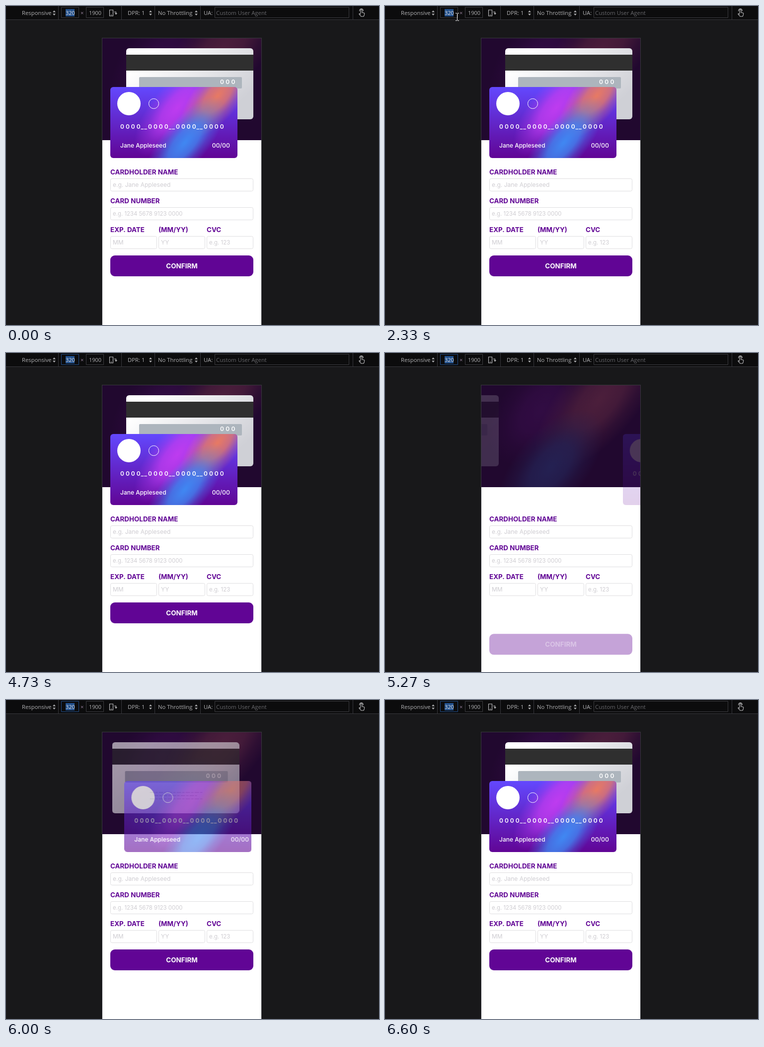
These frames come from a looping animation (751 px wide and 642 px high, 8 s). An HTML page with a canvas:

```html
<!DOCTYPE html>
<html lang="en">
<head>
<meta charset="utf-8">
<title>Card form</title>
<style>
html, body { margin: 0; width: 100%; height: 100%; overflow: hidden; background: #18181a; }
canvas { display: block; }
</style>
</head>
<body>
<canvas id="stage" width="751" height="642"></canvas>
<script>
const LOOP = 8000, STEP = 1000 / 15;
const RELOAD = 4915, FOCUS = 4730;
const PURPLE = '#610595', LINE = '#38383d';
const UI = '"Open Sans", "Noto Sans", sans-serif';
const FORM = 'Inter, "Open Sans", sans-serif';
const PAGE = { x: 194, y: 65, w: 320, h: 577 };
const CARD = { w: 256, h: 143 };

const ctx = document.getElementById('stage').getContext('2d');

const clamp = v => Math.max(0, Math.min(1, v));
const lerp = (a, b, p) => a + (b - a) * p;

function layer(w, h) {
  const c = document.createElement('canvas');
  c.width = w;
  c.height = h;
  return c.getContext('2d');
}

function rect(g, x, y, w, h, fill) {
  g.fillStyle = fill;
  g.fillRect(x, y, w, h);
}

function round(g, x, y, w, h, r, fill, stroke) {
  g.beginPath();
  g.roundRect(x, y, w, h, r);
  if (fill) { g.fillStyle = fill; g.fill(); }
  if (stroke) { g.strokeStyle = stroke; g.lineWidth = 1; g.stroke(); }
}

function text(g, str, x, y, font, fill, { align = 'left', spacing = 0 } = {}) {
  g.font = font;
  g.fillStyle = fill;
  g.textAlign = align;
  g.letterSpacing = spacing + 'px';
  g.fillText(str, x, y);
}

function circle(g, x, y, r) {
  g.beginPath();
  g.arc(x, y, r, 0, Math.PI * 2);
}

// Soft ellipse leaning to the upper right
function blob(g, x, y, rx, ry, rgb) {
  const fade = g.createRadialGradient(0, 0, 0, 0, 0, 1);
  [[0, 0.95], [0.4, 0.75], [0.7, 0.3], [1, 0]].forEach(([at, a]) =>
    fade.addColorStop(at, `rgba(${rgb},${a})`));
  g.save();
  g.translate(x, y);
  g.rotate(-0.87);
  g.scale(rx, ry);
  circle(g, 0, 0, 1);
  g.fillStyle = fade;
  g.fill();
  g.restore();
}

function vertical(g, h, top, bottom) {
  const fill = g.createLinearGradient(0, 0, 0, h);
  fill.addColorStop(0, top);
  fill.addColorStop(1, bottom);
  return fill;
}

function makeHeader() {
  const g = layer(320, 205);
  rect(g, 0, 0, 320, 205, '#21082f');
  blob(g, 120, 50, 130, 80, '50,12,68');
  blob(g, 238, 28, 180, 78, '78,32,60');
  blob(g, 140, 165, 140, 72, '36,34,84');
  return g.canvas;
}

function makeBack() {
  const g = layer(CARD.w, CARD.h);
  const fill = g.createLinearGradient(60, 0, 190, CARD.h);
  fill.addColorStop(0, '#ffffff');
  fill.addColorStop(1, '#cfd0d6');
  round(g, 0, 0, CARD.w, CARD.h, 6, fill);
  rect(g, 0, 13, CARD.w, 32, '#2f2f2f');
  round(g, 26, 58, 207, 23, 2, '#adb5bd');
  text(g, '000', 189, 72, `600 12px ${FORM}`, '#fff', { spacing: 3.3 });
  g.strokeStyle = '#8f8f99';
  g.setLineDash([9, 2, 5, 2]);
  [101, 107.5, 114].forEach((y, i) => {
    g.beginPath();
    g.moveTo(76 + i % 2 * 8, y);
    g.lineTo(183 - i % 2 * 12, y);
    g.stroke();
  });
  return g.canvas;
}

function makeFront() {
  const g = layer(CARD.w, CARD.h);
  g.beginPath();
  g.roundRect(0, 0, CARD.w, CARD.h, 6);
  g.clip();
  rect(g, 0, 0, CARD.w, CARD.h, vertical(g, CARD.h, '#6348fe', PURPLE));
  blob(g, 135, 42, 120, 50, '195,60,240');
  blob(g, 216, 18, 105, 46, '238,125,92');
  blob(g, 150, 112, 115, 46, '62,142,246');
  circle(g, 37.5, 33.5, 23.5);
  g.fillStyle = '#fff';
  g.fill();
  circle(g, 87.5, 33.5, 10);
  g.strokeStyle = '#fff';
  g.lineWidth = 1;
  g.stroke();
  for (let i = 0; i < 4; i++) {
    const x = 20 + i * 56;
    text(g, '0000', x, 84, `600 12px ${FORM}`, '#fff', { spacing: 3 });
    if (i < 3) text(g, '__', x + 41.5, 84, `600 12px ${FORM}`, '#fff', { spacing: 1 });
  }
  return g.canvas;
}

const header = makeHeader(), back = makeBack(), plate = makeFront();
const front = layer(CARD.w, CARD.h);

function drawFront(age) {
  const name = clamp(age / 960), date = clamp(age / 1200);
  front.clearRect(0, 0, CARD.w, CARD.h);
  front.drawImage(plate, 0, 0);
  front.globalAlpha = name;
  text(front, 'Jane Appleseed', 20 + 172 * (1 - name), 122, `500 12px ${FORM}`, '#fff');
  front.globalAlpha = date;
  text(front, '00/00', 241 + 100 * (1 - date), 122, `500 12.3px ${FORM}`, '#fff', { align: 'right' });
  front.globalAlpha = 1;
}

// Cards cross over, overshoot by a fifth, then settle
function cardPose(age) {
  const turn = 1328, end = 1660;
  if (age < turn) {
    const p = clamp(age / turn);
    return { shift: lerp(1.5, -0.2, p) * CARD.w, alpha: 0.7 * p };
  }
  const p = clamp((age - turn) / (end - turn));
  return { shift: lerp(-0.2, 0, p) * CARD.w, alpha: lerp(0.7, 1, p) };
}

function field(label, hint, x, y, w, size = 12) {
  text(ctx, label, x, y, `700 13.4px ${FORM}`, PURPLE);
  round(ctx, x + 0.5, y + 8.5, w - 1, 25, 3, '#fff', '#dfdee0');
  text(ctx, hint, x + 5, y + 25, `${size}px ${FORM}`, '#cfcdd2');
}

function drawPage(age) {
  ctx.strokeStyle = LINE;
  ctx.lineWidth = 1;
  ctx.strokeRect(PAGE.x - 0.5, PAGE.y - 0.5, PAGE.w + 1, PAGE.h + 20);
  ctx.save();
  ctx.beginPath();
  ctx.rect(PAGE.x, PAGE.y, PAGE.w, PAGE.h);
  ctx.clip();
  rect(ctx, PAGE.x, PAGE.y, PAGE.w, PAGE.h, '#fff');
  ctx.drawImage(header, PAGE.x, PAGE.y);

  const { shift, alpha } = cardPose(age);
  drawFront(age);
  ctx.globalAlpha = alpha;
  ctx.drawImage(back, 242 - shift, 85);
  ctx.drawImage(front.canvas, 210 + shift, 163);
  ctx.globalAlpha = 1;

  field('CARDHOLDER NAME', 'e.g. Jane Appleseed', 210, 339, 288);
  field('CARD NUMBER', 'e.g. 1234 5678 9123 0000', 210, 397, 288, 11.4);
  field('EXP. DATE', 'MM', 210, 455, 94);
  field('(MM/YY)', 'YY', 307, 455, 94);
  field('CVC', 'e.g. 123', 404, 455, 94, 11.5);

  const rise = clamp(age / 960);
  const y = 502 + 100 * (1 - rise);
  ctx.globalAlpha = rise;
  round(ctx, 210, y, 288, 42, 9, PURPLE);
  text(ctx, 'CONFIRM', 354, y + 26, `700 13.4px ${FORM}`, '#fff', { align: 'center' });
  ctx.globalAlpha = 1;
  ctx.restore();
}

function spinner(x) {
  ctx.fillStyle = '#b1b1b3';
  [-1, 1].forEach(dir => {
    ctx.beginPath();
    ctx.moveTo(x - 3, 14 + dir * 1.5);
    ctx.lineTo(x + 3, 14 + dir * 1.5);
    ctx.lineTo(x, 14 + dir * 5);
    ctx.fill();
  });
}

function strokePath(d, x, y) {
  ctx.save();
  ctx.translate(x, y);
  ctx.strokeStyle = '#c4c4c6';
  ctx.lineWidth = 1.1;
  ctx.stroke(new Path2D(d));
  ctx.restore();
}

function drawToolbar(focused) {
  const grey = '#b1b1b3', font = `11.3px ${UI}`;
  rect(ctx, 0, 0, 751, 27, '#0c0c0d');
  rect(ctx, 0, 27, 751, 1, LINE);
  [105, 232, 299, 391, 698].forEach(x => rect(ctx, x, 0, 1, 27, LINE));
  round(ctx, 111.5, 2.5, 35, 21, 0, '#0c0c0d', focused ? '#204e8a' : '#3c3c40');
  round(ctx, 161.5, 2.5, 35, 21, 0, '#0c0c0d', '#3c3c40');
  round(ctx, 420.5, 2.5, 270, 21, 0, '#0c0c0d', '#3c3c40');
  rect(ctx, 120, 6, 18, 15, '#204e8a');

  text(ctx, 'Responsive', 32, 18, font, grey);
  text(ctx, '320', 120, 18, `11px ${UI}`, '#e6e6e8');
  text(ctx, '×', 150, 18, font, '#98829c');
  text(ctx, '1900', 167, 18, `11px ${UI}`, grey);
  text(ctx, 'DPR: 1', 245, 18, font, grey);
  text(ctx, 'No Throttling', 306, 18, font, grey);
  text(ctx, 'UA:', 398, 18, font, grey);
  text(ctx, 'Custom User Agent', 423, 18, font, '#68686c');
  [97, 291, 383].forEach(spinner);

  strokePath('M.5 .5h7v12h-7zM3 10.5h2M9.500 4.500h4v4M11.500 7l2 2 2-2', 208, 7.500);
  strokePath('M4 9V2.500a1.500 1.500 0 0 1 3 0V7l4 1q1 .4 .8 1.500L11 13l-1 2H5L1 10.500q0-1.500 1.500-1L4 11M2 4.500a3.700 3.700 0 1 1 7 0', 710, 6);
}

// Pointer visits: [time, x, y]
const PATH = [
  [530, 203, 575], [750, 150, 400], [950, 102, 200], [1130, 112, 70],
  [1266, 136, 17], [1395, 136, 17], [1400, 136, 16], [1466, 136, 17],
  [1600, 136, 17], [1760, 138, 25], [1930, 114, 25], [2000, 114, 25],
  [2240, 153, 34], [2400, 140, 14], [2520, 125, 12], [2665, 110, 26],
  [2860, 110, 26], [3262, 63, 64]
];
const GONE = 3325;

function pointerAt(t) {
  if (t < PATH[0][0] || t > GONE) return null;
  const next = PATH.findIndex(p => p[0] > t);
  if (next < 0) return PATH[PATH.length - 1].slice(1);
  const [t0, x0, y0] = PATH[next - 1], [t1, x1, y1] = PATH[next];
  const p = (t - t0) / (t1 - t0);
  return [Math.round(lerp(x0, x1, p)), Math.round(lerp(y0, y1, p))];
}

function drawPointer(t) {
  const at = pointerAt(t);
  if (!at) return;
  const [x, y] = at;
  ctx.save();
  ctx.translate(x, y);
  if (x > 111 && x < 147 && y > 2 && y < 24) {
    const beam = new Path2D('M-3 -7.500h2.500l1 1 1-1H4M.5 -6.500v13M-3 7.500h2.500l1-1 1 1H4');
    ctx.strokeStyle = '#fff';
    ctx.lineWidth = 1;
    ctx.stroke(beam);
  } else {
    const arrow = new Path2D('M.5 .5V16.500L4 13l2.500 5.500 2.300-1L6.500 12H11.500Z');
    ctx.fillStyle = '#fff';
    ctx.fill(arrow);
    ctx.strokeStyle = '#000';
    ctx.lineWidth = 1;
    ctx.stroke(arrow);
  }
  ctx.restore();
}

function draw(t) {
  rect(ctx, 0, 0, 751, 642, '#18181a');
  drawToolbar(t > FOCUS);
  drawPage(t < RELOAD ? Infinity : t - RELOAD);
  drawPointer(t);
}

const start = performance.now();
function tick() {
  const t = (performance.now() - start) % LOOP;
  draw(Math.floor((t + 4) / STEP) * STEP);
  requestAnimationFrame(tick);
}
tick();
</script>
</body>
</html>
```
